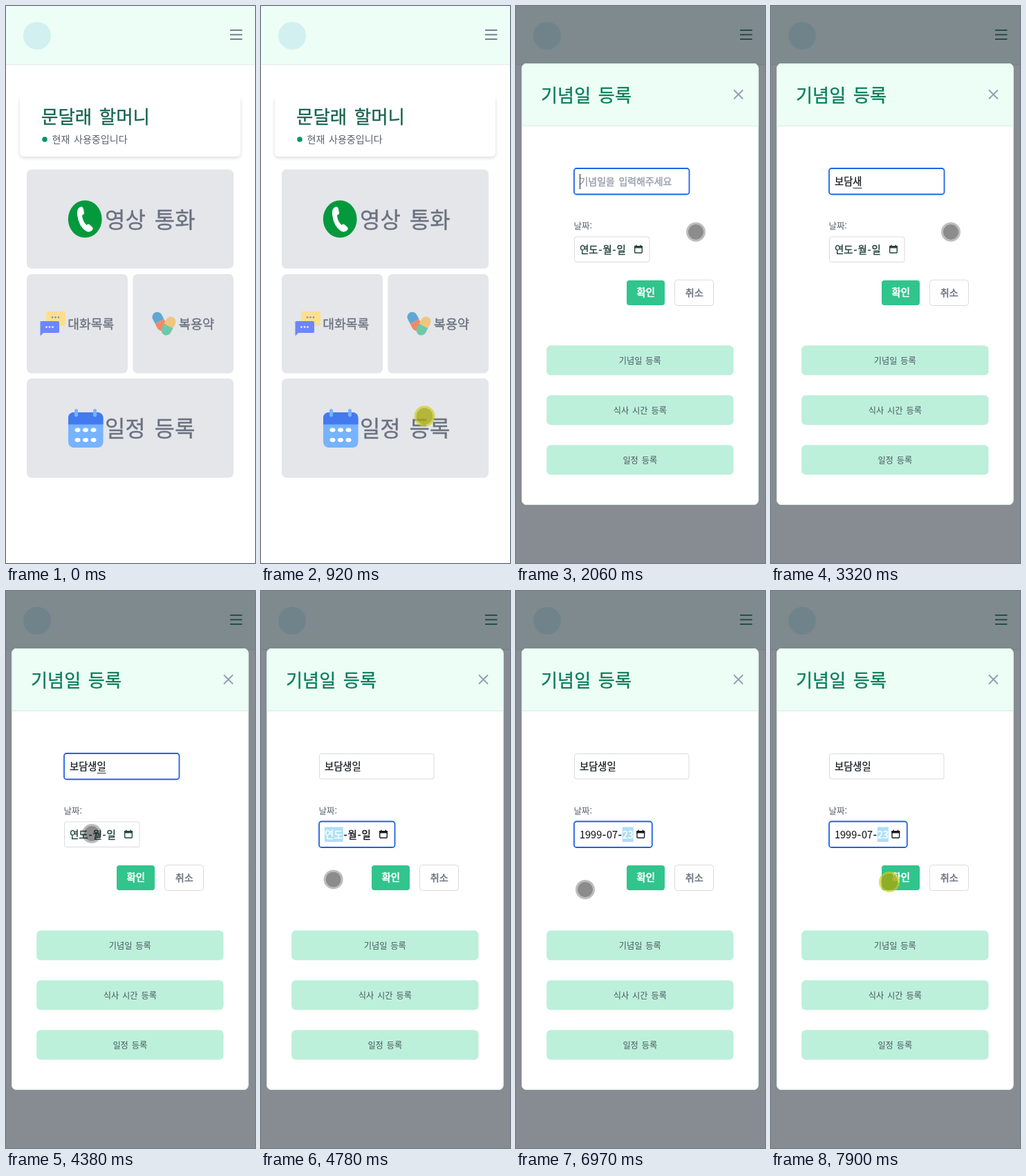
Write an HTML page with a canvas that moves like this. It is 360 px wide and 806 px high and loops after 8000 ms.

```html
<!DOCTYPE html>
<html lang="ko">
<head>
<meta charset="utf-8">
<title>기념일 등록</title>
<style>
  html, body { margin: 0; width: 100%; height: 100%; overflow: hidden; background: #fff; }
  canvas { display: block; width: 360px; height: 806px; }
</style>
</head>
<body>
<canvas id="stage"></canvas>
<script>
const W = 360, H = 806, LOOP = 8000, TICK = 66.35;
const FONT = '"Noto Sans CJK KR", "Noto Sans CJK", sans-serif';
const canvas = document.getElementById('stage');
const ctx = canvas.getContext('2d');
const dpr = window.devicePixelRatio || 1;
canvas.width = W * dpr;
canvas.height = H * dpr;

const MODAL_AT = 1060, NAME_FOCUS = 1720, DATE_FOCUS = 4520;

// Shapes

function box(x, y, w, h, r, fill, stroke, line = 1) {
  ctx.beginPath();
  ctx.roundRect(x, y, w, h, r);
  if (fill) { ctx.fillStyle = fill; ctx.fill(); }
  if (stroke) { ctx.strokeStyle = stroke; ctx.lineWidth = line; ctx.stroke(); }
}

function oval(x, y, rx, ry, fill) {
  ctx.beginPath();
  ctx.ellipse(x, y, rx, ry, 0, 0, 2 * Math.PI);
  ctx.fillStyle = fill;
  ctx.fill();
}

function shape(d, fill) {
  ctx.fillStyle = fill;
  ctx.fill(new Path2D(d));
}

function line(x1, y1, x2, y2, color, width) {
  ctx.beginPath();
  ctx.moveTo(x1, y1);
  ctx.lineTo(x2, y2);
  ctx.strokeStyle = color;
  ctx.lineWidth = width;
  ctx.stroke();
}

// cy is the middle of the letters; extra thickens the regular weight.
function text(str, x, cy, size, color, extra = 0, align = 'left') {
  ctx.font = `400 ${size}px ${FONT}`;
  ctx.wordSpacing = `${size * 0.18}px`;
  ctx.textAlign = align;
  ctx.textBaseline = 'alphabetic';
  ctx.fillStyle = color;
  const y = cy + size * 0.38;
  ctx.fillText(str, x, y);
  if (extra) {
    ctx.strokeStyle = color;
    ctx.lineWidth = extra;
    ctx.lineJoin = 'round';
    ctx.strokeText(str, x, y);
  }
  return ctx.measureText(str).width;
}

// Value of the last [time, value] entry that has begun
function at(list, t) {
  let value = list[0][1];
  for (const [start, v] of list) if (t >= start) value = v;
  return value;
}

// Home page

function menuIcon(color) {
  for (const y of [35, 41.5, 48]) line(324, y, 341.5, y, color, 1.8);
}

function phoneIcon() {
  oval(114.2, 308.3, 24.4, 27, '#04993d');
  shape('M103.5 295Q105.5 290.5 109 290.5Q111.5 290.5 112 294L113 299Q113.5 301 110 303' +
    'Q110.5 311 116.5 317Q118.5 314.5 120.5 316L125 320Q126.5 322 124.5 324.5' +
    'Q121 328 116 326Q105 319 103 302Q102.5 298 103.5 295Z', '#fff');
}

function chatIcon() {
  box(58, 441.8, 28, 21.2, 2, '#ffdf8c');
  shape('M51 456H75Q77 456 77 458V471Q77 473 75 473H54L49.5 477.5V458Q49 456 51 456Z', '#6d86fc');
  for (const i of [0, 1, 2]) {
    oval(67 + 4.5 * i, 450.5, 1.3, 1.3, '#6d86fc');
    oval(58.5 + 4.5 * i, 464.5, 1.3, 1.3, '#fff');
  }
}

function capsule(x, y, angle, length, width, top, bottom) {
  const h = length / 2, w = width / 2;
  ctx.save();
  ctx.translate(x, y);
  ctx.rotate(angle);
  box(-w, -h, width, h, [w, w, 0, 0], top);
  box(-w, 0, width, h, [0, 0, w, w], bottom);
  ctx.restore();
}

function calendarIcon() {
  box(90, 588, 50.5, 51, 8, '#77b3ff');
  box(90, 588, 50.5, 17.5, [8, 8, 0, 0], '#447af0');
  for (const x of [99, 126]) box(x, 583, 5, 11.5, 2.5, '#77b3ff');
  for (const y of [613.5, 628])
    for (const x of [103.5, 115, 126.5]) oval(x, y, 4, 2.9, '#fff');
}

function homePage() {
  ctx.fillStyle = '#fff';
  ctx.fillRect(0, 0, W, H);
  ctx.fillStyle = '#edfef7';
  ctx.fillRect(0, 0, W, 84);
  ctx.fillStyle = '#e5e9ea';
  ctx.fillRect(0, 84, W, 1.2);
  oval(45, 43, 20, 20, '#d2f0ef');

  ctx.save();
  ctx.shadowColor = 'rgba(0,0,0,.15)';
  ctx.shadowBlur = 5 * dpr;
  ctx.shadowOffsetY = 2 * dpr;
  box(20, 130, 319, 88, 6, '#fff');
  ctx.restore();
  box(20, 122, 319, 70, 6, '#fff');
  text('문달래 할머니', 51, 160, 26.5, '#16644f', 0.35);
  oval(56, 193, 3.8, 3.8, '#0a946a');
  text('현재 사용중입니다', 66.5, 193, 14.05, '#5b626c');

  const tile = '#e4e6ea', ink = '#6b7280';
  box(30, 236.5, 299, 143.5, 7, tile);
  box(30, 388, 146, 143.5, 7, tile);
  box(183.3, 388, 145.7, 143.5, 7, tile);
  box(30, 539, 299, 143.7, 7, tile);
  phoneIcon();
  text('영상 통화', 143, 309, 32, ink, 0.35);
  chatIcon();
  text('대화목록', 89.3, 460, 18.2, ink, 0.3);
  capsule(222, 456.5, -0.47, 29, 14.5, '#62a7d3', '#ee8a66');
  capsule(235, 463, 0.48, 28.5, 14.5, '#efc67f', '#70c8aa');
  text('복용약', 249.8, 460, 18.6, ink, 0.3);
  calendarIcon();
  text('일정 등록', 143, 611, 31.9, ink, 0.35);
}

// Form

const typed = [
  [0, ''], [2650, 'ㅂ'], [2790, '보'], [2860, '볻'], [2920, '보다'], [3050, '보담'],
  [3250, '보담ㅅ'], [3320, '보담새'], [3390, '보담생'],
  [3590, '보담생ㅇ'], [3650, '보담생이'], [3720, '보담생일']
];

// Year, month, day and the index of the selected part
const dates = [
  [0, ['연도', '월', '일', -1]], [DATE_FOCUS, ['연도', '월', '일', 0]],
  [5310, ['0001', '월', '일', 0]], [5440, ['0019', '월', '일', 0]],
  [5640, ['0199', '월', '일', 0]], [5710, ['1999', '월', '일', 1]],
  [5980, ['1999', '00', '일', 1]], [6310, ['1999', '07', '일', 2]],
  [6700, ['1999', '07', '02', 2]], [6970, ['1999', '07', '23', 2]]
];

function field(x, y, w, h, focused) {
  if (focused) box(x, y, w, h, 3.5, '#fff', '#1f63e4', 1.8);
  else box(x + 0.5, y + 0.5, w - 1, h - 1, 3, '#fff', '#d8dbe0');
}

function nameField(t) {
  const focused = t >= NAME_FOCUS && t < DATE_FOCUS;
  const value = at(typed, t);
  field(84, 235, 166.5, 37.5, focused);
  if (!value) {
    text('기념일을 입력해주세요', 91.5, 253.5, 13.95, '#9ca3af', 0.5);
    if (focused && t < 2390) line(92.5, 243, 92.5, 265, '#222', 1);
    return;
  }
  const width = text(value, 92, 253.5, 14.3, '#151a20', 0.25);
  if (focused) line(92 + width - 13, 263.5, 92 + width, 263.5, '#333', 1);
}

function dateField(t) {
  const parts = at(dates, t), selected = parts[3];
  const focused = selected >= 0;
  const color = focused ? '#161b20' : '#24463f';
  const size = 14.5, gap = 6.7;
  ctx.font = `400 ${size}px ${FONT}`;
  const widths = [0, 1, 2].map(i => ctx.measureText(parts[i]).width);
  const end = 92 + widths[0] + widths[1] + widths[2] + 2 * gap;
  const right = Math.max(193.5, end + 27);
  field(84, 333.5, right - 84, 37.5, focused);

  let x = 92;
  for (let i = 0; i < 3; i++) {
    const on = i === selected;
    const digits = /\d/.test(parts[i]);
    if (on) {
      ctx.fillStyle = '#afdff7';
      ctx.fillRect(x, 341.5, widths[i], 21.5);
    }
    text(parts[i], x, 352, size, on ? '#fff' : color, on || !digits ? 0.4 : 0.1);
    x += widths[i];
    if (i < 2) text('-', x + gap / 2, 352, size, color, 0.4, 'center');
    x += gap;
  }

  const ix = right - 22.5;
  box(ix + 0.7, 347.7, 10.6, 9.6, 1, null, color, 1.4);
  ctx.fillStyle = color;
  ctx.fillRect(ix, 347, 12, 3.4);
  ctx.fillRect(ix + 2, 345.7, 1.5, 2);
  ctx.fillRect(ix + 8.5, 345.7, 1.5, 2);
}

function modal(t) {
  ctx.fillStyle = 'rgba(17,24,39,.5)';
  ctx.fillRect(0, 0, W, H);

  box(8.2, 83, 342.4, 639, 7, '#fff');
  box(8.2, 83, 342.4, 90.5, [7, 7, 0, 0], '#ecfef6');
  box(8.7, 83.5, 341.4, 638, 6.5, null, '#d8efe5', 1);
  line(9, 173.5, 350, 173.5, '#d9e8e2', 1);
  text('기념일 등록', 36, 129, 26.2, '#0a7d59', 0.35);
  line(315, 121.5, 328, 134.5, '#94a1ac', 1.9);
  line(328, 121.5, 315, 134.5, '#94a1ac', 1.9);

  nameField(t);
  text('날짜:', 83.5, 318, 12.5, '#5c636d');
  dateField(t);

  box(160, 397, 55, 36, 4, '#31c48d');
  text('확인', 187.7, 415, 14.4, '#fff', 0.7, 'center');
  box(229.5, 396.5, 56, 37, 4, '#fff', '#d8dbe0');
  text('취소', 257.7, 415, 14.2, '#6b7280', 0.45, 'center');

  ['기념일 등록', '식사 시간 등록', '일정 등록'].forEach((label, i) => {
    box(44.2, 491.2 + 72 * i, 270.3, 43, 6, '#bcf0da');
    text(label, 179.3, 513.7 + 72 * i, 12.2, '#4b5563', 0, 'center');
  });
}

// Touch pointer: time, x, y

const path = [
  [660, 341, 781], [725, 318, 735], [790, 284, 668], [855, 246, 605], [910, 236.5, 593.6],
  [1255, 237, 594], [1320, 243, 554], [1450, 235, 378], [1580, 218, 261],
  [1720, 218, 261], [1850, 220, 300], [2050, 260, 327],
  [4110, 260, 327], [4180, 245, 322], [4250, 173, 313], [4370, 124, 351],
  [4580, 124, 351], [4715, 107, 410], [4900, 100, 432],
  [7370, 100, 432], [7500, 109, 440], [7650, 138, 436], [7830, 171, 421], [8000, 171, 421]
];
const presses = [[905, MODAL_AT], [1580, NAME_FOCUS], [4440, DATE_FOCUS], [7890, LOOP]];

function pointer(t) {
  if (t < path[0][0]) return;
  const next = path.findIndex(p => p[0] > t);
  const [t0, x0, y0] = path[next - 1], [t1, x1, y1] = path[next];
  const k = (t - t0) / (t1 - t0);
  const x = x0 + (x1 - x0) * k, y = y0 + (y1 - y0) * k;
  const down = presses.some(([a, b]) => t >= a && t < b);
  const outer = down ? 15 : 14, inner = down ? 12 : 11;

  ctx.beginPath();
  ctx.arc(x, y, outer, 0, 2 * Math.PI);
  ctx.arc(x, y, inner, 0, 2 * Math.PI, true);
  ctx.fillStyle = down ? 'rgba(205,206,25,.7)' : 'rgba(0,0,0,.26)';
  ctx.fill();
  oval(x, y, inner, inner, down ? 'rgba(168,168,10,.79)' : 'rgba(0,0,0,.45)');
}

function draw(t) {
  ctx.setTransform(dpr, 0, 0, dpr, 0, 0);
  const open = t >= MODAL_AT;
  homePage();
  if (open) modal(t);
  menuIcon(open ? '#1d4840' : '#6b7280');
  pointer(Math.floor((t + 10) / TICK) * TICK);
}

const start = performance.now();
function loop() {
  draw((performance.now() - start) % LOOP);
  requestAnimationFrame(loop);
}
loop();
</script>
</body>
</html>
```
